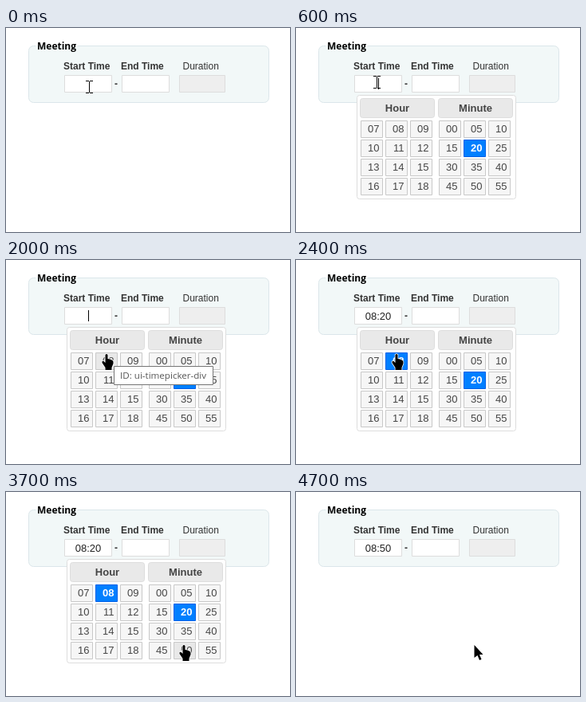
Recreate the animation shown at these times as an HTML page with a canvas. Size 356 by 256 pixels, loop 6.1 s.

```html
<!DOCTYPE html>
<html lang="en">
<head>
<meta charset="utf-8">
<title>Time picker</title>
<style>
  html, body { margin: 0; width: 100%; height: 100%; overflow: hidden; background: #fff; }
  canvas { display: block; width: 100vw; height: 100vh; }
</style>
</head>
<body>
<canvas id="stage" width="356" height="256"></canvas>
<script>
const ctx = document.getElementById('stage').getContext('2d');
const LOOP = 6100, STEP = 100;
const OPEN = 600, PICK_HOUR = 2200, PICK_MINUTE = 4000;
const SANS = '"Liberation Sans", Arial, sans-serif';
const HUMANIST = '"Open Sans", "Noto Sans", sans-serif';

// Pointer hot spot: time, x, y
const pointerPath = [
  [0, 104, 74], [200, 101, 68], [1000, 101, 68], [1700, 126, 118],
  [3000, 126, 118], [3100, 157, 139], [3700, 223, 192], [LOOP, 223, 192]
];

const hand = new Path2D('M-2 1Q-.5-1 1 1V6L4 6.5L7 8Q8.5 9 8 12L6 17V20H-2V17L-6 11Q-6.5 8-4 9L-2 11Z');
const arrow = new Path2D('M0 0V16L4 13L6.5 19L9 18L6.5 12H11Z');

const clamp = v => Math.max(0, Math.min(1, v));
const twoDigits = n => String(n).padStart(2, '0');

function pointerAt(t) {
  const i = pointerPath.findIndex(p => p[0] > t);
  const [t0, x0, y0] = pointerPath[i - 1], [t1, x1, y1] = pointerPath[i];
  const k = (t - t0) / (t1 - t0), e = k * (2 - k);
  return { x: Math.round(x0 + (x1 - x0) * e), y: Math.round(y0 + (y1 - y0) * e) };
}

function box(x, y, w, h, fill, border, radius = 0) {
  ctx.beginPath();
  ctx.roundRect(x + .5, y + .5, w - 1, h - 1, radius);
  ctx.fillStyle = fill;
  ctx.fill();
  ctx.strokeStyle = border;
  ctx.lineWidth = 1;
  ctx.stroke();
}

function text(str, x, y, font, color = '#333', align = 'left') {
  ctx.font = font;
  ctx.fillStyle = color;
  ctx.textAlign = align;
  ctx.fillText(str, x, y);
}

function drawForm(t) {
  box(28, 22, 302, 72, '#f2f8f8', '#dbe6ea', 6);
  ctx.fillStyle = '#f2f8f8';
  ctx.fillRect(37, 22, 53, 1);
  text('Meeting', 39, 27, `bold 12px ${HUMANIST}`, '#000');
  text('Start Time', 72, 52, `bold 12px ${SANS}`);
  text('End Time', 144, 52, `bold 12px ${SANS}`);
  text('Duration', 221.5, 52, `12px ${SANS}`);
  box(73, 59, 60, 22, '#fff', '#ddd');
  box(145, 59, 60, 22, '#fff', '#ddd');
  box(217, 59, 58, 22, '#eee', '#ddd');
  text('-', 136, 74, `bold 12px ${SANS}`);
  if (t >= PICK_HOUR) {
    text(t < PICK_MINUTE ? '08:20' : '08:50', 103, 75, `13px ${SANS}`, '#222', 'center');
  } else if (t >= 400) {
    ctx.fillStyle = '#000';
    ctx.fillRect(103, 63, 1, 14);
  }
}

function drawPanel(title, left, firstValue, increment, selected, pointer) {
  box(left - 1, 88, 94, 25, '#e9e9e9', '#ddd', 3);
  text(title, left + 46, 105, `bold 13px ${SANS}`, '#444', 'center');
  for (let i = 0; i < 12; i++) {
    const x = left + i % 3 * 31, y = 116 + Math.floor(i / 3) * 24;
    const value = firstValue + i * increment, active = value === selected;
    const hover = pointer.x >= x && pointer.x < x + 31 && pointer.y >= y && pointer.y < y + 24;
    box(x, y, 28, 22, active ? '#007fff' : hover ? '#e8e8e8' : '#f6f6f6', active ? '#0060e8' : '#c8c8c8');
    text(twoDigits(value), x + 23.5, y + 15, `${active ? 'bold ' : ''}13px ${SANS}`,
      active ? '#fff' : '#454545', 'right');
  }
}

function drawPicker(t, pointer) {
  const fade = clamp((t - PICK_MINUTE - 30) / 600);
  ctx.globalAlpha = .5 + .5 * Math.cos(Math.PI * fade);
  box(76, 84, 200, 131, '#fff', '#ddd', 3);
  drawPanel('Hour', 81, 7, 1, t >= PICK_HOUR ? 8 : -1, pointer);
  drawPanel('Minute', 179, 0, 5, t < PICK_MINUTE ? 20 : 50, pointer);
  ctx.globalAlpha = 1;
}

function drawTooltip() {
  box(135, 133, 125, 24, '#fff', '#767676');
  text('ID: ui-timepicker-div', 143, 149, `11.6px ${HUMANIST}`, '#575757');
}

function drawPointer(t, { x, y }) {
  if (y < 84) {
    ctx.fillStyle = '#000';
    ctx.fillRect(x, y - 7, 1, 14);
    for (const dy of [-8, 7]) {
      ctx.fillRect(x - 4, y + dy, 4, 1);
      ctx.fillRect(x + 1, y + dy, 4, 1);
    }
    return;
  }
  const shape = y >= 116 && t < 4600 ? hand : arrow;
  ctx.save();
  ctx.translate(x + .5, y);
  ctx.strokeStyle = '#fff';
  ctx.lineWidth = 1.5;
  ctx.stroke(shape);
  ctx.fillStyle = '#000';
  ctx.fill(shape);
  ctx.restore();
}

function draw(t) {
  const pointer = pointerAt(t);
  ctx.fillStyle = '#fff';
  ctx.fillRect(0, 0, 356, 256);
  drawForm(t);
  if (t >= OPEN && t < 4600) drawPicker(t, pointer);
  if (t >= 1800 && t < PICK_HOUR) drawTooltip();
  drawPointer(t, pointer);
}

const start = performance.now();
function frame() {
  const t = (performance.now() - start) % LOOP;
  draw(Math.floor(t / STEP) * STEP);
  requestAnimationFrame(frame);
}
frame();
</script>
</body>
</html>
```
